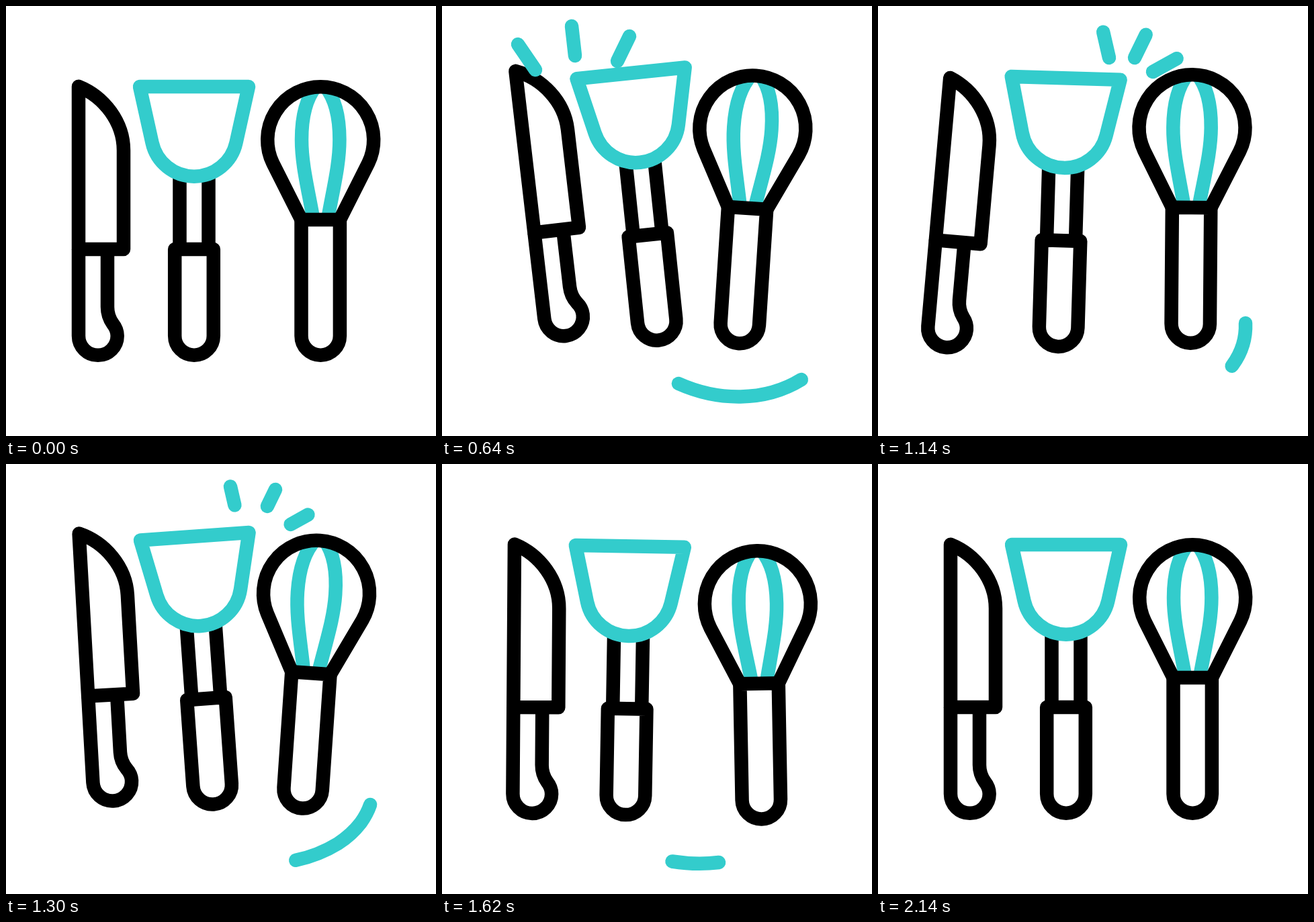
Recreate the animation shown at these times as an HTML page with a canvas. Size 640 by 640 pixels, loop 2580 ms.

```html
<!DOCTYPE html>
<html lang="en">
<head>
<meta charset="utf-8">
<title>Kitchen tools</title>
<style>
html, body { margin: 0; width: 100%; height: 100%; overflow: hidden; background: #fff; }
canvas { display: block; width: 100vmin; height: 100vmin; }
</style>
</head>
<body>
<canvas id="stage"></canvas>
<script>
const LOOP = 2580, BEGIN = 160, END = 2140;
const SIZE = 640, TOP = 109.5;
const TEAL = '#33cccc', BLACK = '#000';
const canvas = document.getElementById('stage');
const ctx = canvas.getContext('2d');
const ratio = window.devicePixelRatio || 1;
canvas.width = canvas.height = SIZE * ratio;

function progress(t, from, to) {
  return Math.min(1, Math.max(0, (t - from) / (to - from)));
}

function ease(t, from, to) {
  const u = progress(t, from, to);
  return u * u * (3 - 2 * u);
}

// Leaves rest, swings through evenly spaced peaks and settles at rest again.
function swing(first, step, peaks) {
  const last = first + step * (peaks.length - 1);
  return t => {
    if (t < first) return peaks[0] * ease(t, BEGIN, first);
    if (t >= last) return peaks[peaks.length - 1] * (1 - ease(t, last, END));
    const i = Math.floor((t - first) / step);
    const from = first + i * step;
    const u = (1 - Math.cos(Math.PI * progress(t, from, from + step))) / 2;
    return peaks[i] + (peaks[i + 1] - peaks[i]) * u;
  };
}

const bounce = (...peaks) => swing(600, 270, peaks);
const part = (d, color = BLACK) => ({ path: new Path2D(d), color });

const tools = [
  { // knife
    x: 141.5,
    parts: [
      part('M108 362V491A28.8 28.8 0 0 0 165.7 491C165.7 484 163 478 159 473C154 466 151 459 151 448V362'),
      part('M108 119.7C146 135 175 173 175 215V362H108Z')
    ],
    turn: swing(680, 374, [-6.75, 6.8, -6.7, 6.8]),
    lift: bounce(-28, -3.6, -9.7, -22.5, 3)
  },
  { // spatula
    x: 280,
    parts: [
      part('M258.5 250V362M301.5 250V362'),
      part('M251.2 362H308.8V491A28.8 28.8 0 0 1 251.2 491Z'),
      part('M199 120H361L342.5 203.4A64 64 0 0 1 217.5 203.4Z', TEAL)
    ],
    turn: swing(620, 385, [-6.05, 4.4, -5.3, 4.3]),
    lift: bounce(-21.5, 4, -12.7, -12, 4.2)
  },
  { // whisk
    x: 468.2,
    parts: [
      part('M462 119C446 138 440 167 440 199C440 235 449 270 456.5 312' +
        'M474.4 119C490.4 138 496.4 167 496.4 199C496.4 235 487.4 270 479.9 312', TEAL),
      part('M439.5 318L397.2 234A79 79 0 1 1 539.2 234L496.9 318'),
      part('M439.5 318H496.9V491A28.7 28.7 0 0 1 439.5 491Z')
    ],
    turn: swing(610, 365, [3.85, -2.3, 4.1, -1.8]),
    lift: bounce(-19, 23, -18, 0, 10)
  }
];

// Teal strokes that grow from one end and then leave from the same end.
function trail(d, grow, leave) {
  const ruler = document.createElementNS('http://www.w3.org/2000/svg', 'path');
  ruler.setAttribute('d', d);
  return { path: new Path2D(d), length: ruler.getTotalLength(), grow, leave };
}

const sparks = (start, ...lines) =>
  lines.map(d => trail(d, [start, start + 180], [start + 240, start + 390]));

const trails = [
  ...sparks(450, 'M139 95L113 57', 'M198 74L193 30', 'M261 82L279 45'),
  ...sparks(1000, 'M344 77L334 33.5', 'M382 77L401 38', 'M409 98L449.5 75.5'),
  trail('M352 562C410 588 480 590 535 556C558 541 577 517 580 492', [322, 822], [650, 950]),
  trail('M547 472C548 496 541 516 528 534C518 547 508 556 494 565C450 592 397 600 342.5 591.5',
    [957, 1517], [1135, 1864])
];

function drawTool(tool, t) {
  ctx.save();
  ctx.translate(tool.x, TOP + tool.lift(t));
  ctx.rotate(tool.turn(t) * Math.PI / 180);
  ctx.translate(-tool.x, -TOP);
  for (const p of tool.parts) {
    ctx.strokeStyle = p.color;
    ctx.stroke(p.path);
  }
  ctx.restore();
}

function drawTrail(s, t) {
  const head = ease(t, ...s.grow) * s.length;
  const tail = ease(t, ...s.leave) * s.length;
  if (head - tail < 0.1) return;
  ctx.setLineDash([head - tail, 9999]);
  ctx.lineDashOffset = -tail;
  ctx.stroke(s.path);
}

function draw(t) {
  ctx.setTransform(ratio, 0, 0, ratio, 0, 0);
  ctx.fillStyle = '#fff';
  ctx.fillRect(0, 0, SIZE, SIZE);
  ctx.lineWidth = 20.5;
  ctx.lineJoin = 'round';
  ctx.lineCap = 'butt';
  for (const tool of tools) drawTool(tool, t);
  ctx.lineCap = 'round';
  ctx.strokeStyle = TEAL;
  for (const s of trails) drawTrail(s, t);
  ctx.setLineDash([]);
}

const start = performance.now();
function tick() {
  draw((performance.now() - start) % LOOP);
  requestAnimationFrame(tick);
}
tick();
</script>
</body>
</html>
```
